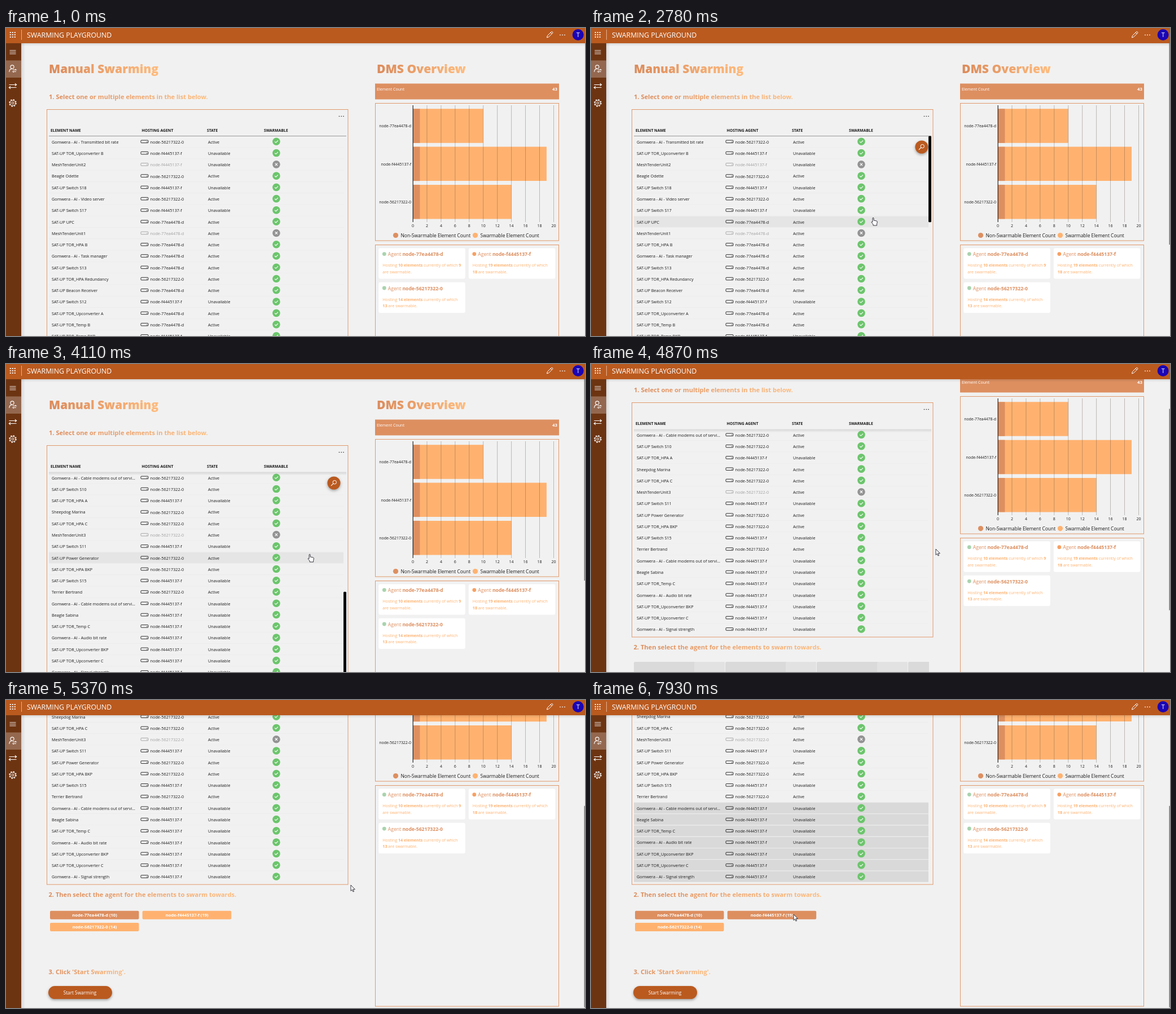
Animation, 1026 px wide and 546 px high, one loop 8000 ms. Source, as an HTML page with a canvas:

```html
<!DOCTYPE html>
<html lang="en">
<head>
<meta charset="utf-8">
<title>Swarming Playground</title>
<style>
html, body { margin: 0; width: 100%; height: 100%; overflow: hidden; background: #f1f1f1; }
canvas { display: block; }
</style>
</head>
<body>
<canvas id="stage" width="1026" height="546"></canvas>
<script>
const g = document.getElementById('stage').getContext('2d');
const LOOP = 8000, ROW = 20.27, TOP = 191.6, VIEW = 18 * ROW;
const BG = '#f1f1f1', BRAND = '#ba5a1f', DARK = '#dd8f60', LIGHT = '#ffb270', EDGE = '#e0986b';
const FONT = '"Open Sans", "Noto Sans", sans-serif';

const hosts = { 7: 'node-77ea4478-d', f: 'node-f4445137-f', 5: 'node-56217322-0' };
// Host key, then name: * is an AI probe, + is an uplink part
const rows = `5*Transmitted bit rate|f+TOR_Upconverter B|fMeshTenderUnit2|5Beagle Odette|f+Switch S18
5*Video server|f+Switch S17|7+UPC|7MeshTenderUnit1|7+TOR_HPA B|7*Task manager|7+Switch S13
5+TOR_HPA Redundancy|7+Beacon Receiver|f+Switch S12|7+TOR_Upconverter A|7+TOR_Temp B
f+TOR_Temp BKP|7+Switch S14|7Antelope Finn|f+Combiner|f+Switch S19|5Sheepdog Milo|5+TOR_Temp A
f*Cable modems out of servi...|5*Cable modems out of servi...|5+Switch S10|f+TOR_HPA A
5Sheepdog Marina|5+TOR_HPA C|5MeshTenderUnit3|f+Switch S11|5+Power Generator|5+TOR_HPA BKP
f+Switch S15|5Terrier Bertrand|f*Cable modems out of servi...|fBeagle Sabina|f+TOR_Temp C
f*Audio bit rate|f+TOR_Upconverter BKP|f+TOR_Upconverter C|f*Signal strength`
  .split(/[|\n]/).map(s => ({
    host: s[0],
    name: s.slice(1).replace('*', 'Gomwera - AI - ').replace('+', 'SAT-UP '),
    fixed: s.includes('Tender')
  }));
const MAX_LIST = rows.length * ROW - VIEW;

// Key times: [ms, x, y, linear?]
const pointerKeys = [
  [330, 1030, 470], [1080, 837, 404], [1280, 837, 404], [1420, 832, 401], [2200, 832, 401],
  [2760, 500, 336], [3900, 500, 336, 1], [4110, 538, 337, 1], [4520, 611, 328], [5400, 611, 328],
  [5600, 590, 319], [6420, 408.5, 196], [6600, 408.5, 196], [6900, 395, 308], [7000, 395, 308],
  [7240, 375, 394], [7310, 375, 394], [7520, 359, 380]
];
const listKeys = [[2860, 0, 0, 1], [3410, 395, 0, 1], [3600, 475, 0, 1], [3820, MAX_LIST, 0]];

function track(keys, t) {
  const i = keys.findIndex(k => k[0] > t);
  if (i === 0) return keys[0].slice(1, 3);
  if (i < 0) return keys[keys.length - 1].slice(1, 3);
  const a = keys[i - 1], b = keys[i];
  let u = (t - a[0]) / (b[0] - a[0]);
  if (!a[3]) u = u * u * (3 - 2 * u);
  return [a[1] + (b[1] - a[1]) * u, a[2] + (b[2] - a[2]) * u];
}
const clamp = v => Math.max(0, Math.min(1, v));
const pageScroll = t => 233 * (1 - (1 - clamp((t - 4760) / 620)) ** 2);

// Drawing helpers
function rect(x, y, w, h, color, r = 0) {
  g.fillStyle = color;
  g.beginPath();
  g.roundRect(x, y, w, h, r);
  g.fill();
}
function frame(x, y, w, h, color) {
  g.strokeStyle = color;
  g.lineWidth = 1;
  g.strokeRect(x, y, w, h);
}
function dot(x, y, r, color) {
  g.fillStyle = color;
  g.beginPath();
  g.arc(x, y, r, 0, 7);
  g.fill();
}
function ring(x, y, r, color, w) {
  g.strokeStyle = color;
  g.lineWidth = w;
  g.beginPath();
  g.arc(x, y, r, 0, 7);
  g.stroke();
}
function path(d, stroke, w = 1, fill) {
  const p = new Path2D(d);
  if (fill) { g.fillStyle = fill; g.fill(p); }
  g.strokeStyle = stroke;
  g.lineWidth = w;
  g.stroke(p);
}
function clip(x, y, w, h) {
  g.save();
  g.beginPath();
  g.rect(x, y, w, h);
  g.clip();
}
function shadow(blur, y) {
  g.shadowColor = 'rgba(0,0,0,.35)';
  g.shadowBlur = blur;
  g.shadowOffsetY = y;
}
// Text centred on its capitals at y; returns its width
function text(s, x, y, size, color = '#1b1b1b', weight = 400, align = 'left') {
  g.font = `${weight} ${size}px ${FONT}`;
  g.textAlign = align;
  g.fillStyle = color;
  g.fillText(s, x, y + size * 0.357);
  return g.measureText(s).width;
}
// Runs alternate regular and bold
function runs(s, x, y, size, color) {
  s.split('*').forEach((part, i) => { x += text(part, x, y, size, color, i % 2 ? 700 : 400); });
}
function heading(s, x, y, size, weight) {
  g.font = `${weight} ${size}px ${FONT}`;
  const fade = g.createLinearGradient(x, 0, x + g.measureText(s).width, 0);
  fade.addColorStop(0, '#dc8a5a');
  fade.addColorStop(1, '#ffbb7c');
  text(s, x, y, size, fade, weight);
}
function fadeBox(x, y, w, h, dx, dy) {
  const f = g.createLinearGradient(x, y, x + dx, y + dy);
  f.addColorStop(0, 'rgba(0,0,0,.11)');
  f.addColorStop(1, 'rgba(0,0,0,0)');
  rect(x, y, w, h, f);
}

function tableRow(row, y, fill) {
  if (fill) rect(76, y + 0.3, 522, ROW - 1, fill);
  rect(76, y + ROW - 0.7, 522, 0.7, '#ebebeb');
  const c = y + 10.5, mark = y + 9.7, ink = row.fixed ? '#a0a0a0' : '#1b1b1b';
  path(`M240 ${mark - 2.3}h11q1 0 1 1v2.6q0 1-1 1h-11q-1 0-1-1v-2.6q0-1 1-1zM249 ${mark + 0.6}h1.5`, ink, 0.9);
  text(row.name, 81, c, 7.25);
  text(hosts[row.host], 255.5, c, 7.3, ink);
  text(row.host === 'f' ? 'Unavailable' : 'Active', 358, c, 7.25);
  dot(479, mark, 6.8, row.fixed ? '#939393' : '#6cc56c');
  path(row.fixed ? `M476.8 ${mark - 2.2}l4.4 4.4m0-4.4l-4.4 4.4` : `M476.2 ${mark}l2 2 3.8-3.8`, '#fff', 1.1);
}

function table(t, list, hover) {
  frame(72.5, 144.5, 533.5, 415.5, EDGE);
  for (const x of [590.5, 594.3, 598]) dot(x, 156.5, 0.8, '#222');
  [['ELEMENT NAME', 79], ['HOSTING AGENT', 240.5], ['STATE', 356], ['SWARMABLE', 457]]
    .forEach(([s, x]) => text(s, x, 181.3, 6.85, '#1b1b1b', 700));

  clip(73, TOP, 532, VIEW);
  rows.forEach((row, i) => {
    const y = TOP + i * ROW - list;
    if (y < TOP - ROW || y > TOP + VIEW) return;
    const picked = i === 36 ? t > 6560 : i > 36 && t > 6950;
    tableRow(row, y, picked ? '#d9d9d9' : i === hover ? '#e5e5e5' : null);
  });
  g.restore();
  if (list > 0) fadeBox(76, TOP, 527, 6, 0, 6);
  else rect(76, TOP - 0.6, 527, 1, '#999');

  // Thumb and search button while the pointer is over the table
  const active = (t > 2540 && t < 4480) || (t > 5460 && t < 7330);
  if (!active) return;
  rect(598, TOP + list / (rows.length * ROW) * VIEW, 5, VIEW * VIEW / (rows.length * ROW), '#0a0a0a', 1.5);
  const x = 581 + 25 * (1 - clamp((t - (t < 5000 ? 2540 : 5460)) / 300));
  clip(73, 145, 532.5, 415);
  g.save();
  shadow(5, 2);
  dot(x, 211, 11.5, BRAND);
  g.restore();
  ring(x + 1.3, 209.6, 3.2, '#fff', 1);
  path(`M${x - 1} ${211.9}l-4 4`, '#fff', 1.1);
  g.restore();
}

function agentButton(key, count, x, y, dark) {
  rect(x, y, 157.5, 15, dark ? DARK : LIGHT, 2);
  text(`${hosts[key]} (${count})`, x + 79, y + 7.6, 7.6, '#fff', 700, 'center');
}

function skeleton() {
  clip(76, 604, 523, 85);
  for (let y = 604; y < 689; y += 20.4)
    for (let x = 76; x < 599; x += 162) {
      rect(x, y, 161, 19, '#dadada', 2);
      rect(x + 107, y, 54, 19, '#e2e2e2', 2);
    }
  g.restore();
}

function steps(t) {
  heading('2. Then select the agent for the elements to swarm towards.', 75.5, 578, 11.1, 700);
  if (t < 5300) skeleton();
  else {
    agentButton('7', 10, 78, 606.7, true);
    agentButton('f', 19, 241.7, 606.7, t > 7400);
    agentButton('5', 14, 78, 628, false);
  }
  heading("3. Click 'Start Swarming'.", 75.5, 715, 11.1, 700);
  g.save();
  shadow(4, 2);
  rect(75, 740, 113, 23, BRAND, 11.5);
  g.restore();
  text('Start Swarming', 131, 751.8, 8.25, '#fff', 400, 'center');
}

function chart() {
  const X0 = 721, UNIT = 12.47;
  rect(654, 98.5, 326, 28, DARK);
  text('Element Count', 657, 108.3, 7.1, '#fff');
  text('43', 977, 108.3, 7.8, '#fff', 700, 'right');
  frame(654.5, 133.5, 325, 243.5, EDGE);
  [['7', 10], ['f', 19], ['5', 14]].forEach(([key, n], i) => {
    const y = 143.3 + i * 67.3;
    rect(X0, y, n * UNIT, 60.5, LIGHT);
    rect(X0, y, UNIT, 60.5, DARK);
    text(hosts[key], 718, y + 30.5, 6.95, '#1b1b1b', 400, 'right');
  });
  for (let v = 0; v <= 20; v += 2) {
    const x = X0 + v * UNIT;
    rect(x - 0.4, 137, v ? 0.9 : 1.1, 207, v ? 'rgba(60,50,40,.33)' : '#111');
    text(v, x, 350.5, 7, '#1b1b1b', 400, 'center');
  }
  dot(690.5, 367.5, 4.6, DARK);
  text('Non-Swarmable Element Count', 699.5, 367.7, 8.45);
  dot(831.5, 367.5, 4.6, LIGHT);
  text('Swarmable Element Count', 840.5, 367.7, 8.45);
}

function agentCard(x, y, key, color, line1, line2) {
  rect(x, y, 153.5, 54.3, '#fff', 3);
  dot(x + 10, y + 10.3, 3.4, color);
  runs(`Agent *${hosts[key]}`, x + 16.5, y + 10.9, 8.65, DARK);
  runs(line1, x + 7, y + 30.3, 7.2, LIGHT);
  runs(line2, x + 7, y + 41.8, 7.2, LIGHT);
}

function overview() {
  heading('DMS Overview', 657, 72.6, 21.1, 800);
  chart();
  frame(654.5, 384.5, 325, 391.5, EDGE);
  agentCard(660.3, 390.3, '7', '#a9d3ae', 'Hosting *10 elements* currently of which *9', 'are swarmable.');
  agentCard(819.8, 390.3, 'f', '#f7a063', 'Hosting *19 elements* currently of which', '*18* are swarmable.');
  agentCard(660.3, 450.7, '5', '#a9d3ae', 'Hosting *14 elements* currently of which', '*13* are swarmable.');
}

function chrome(t, scroll) {
  fadeBox(27, 27, 7, 519, 7, 0);
  fadeBox(27, 27, 999, 5, 0, 5);
  if (t > 400) rect(1024.5, 27 + scroll * 0.69, 1.5, 357, '#7a7a7a');
  rect(0, 27, 27, 519, '#6d3412');
  rect(0, 57.5, 27, 30.5, '#94684f');
  path('M6.5 39.8h11M6.5 42.8h11M6.5 45.8h11', '#fff', 0.9);
  ring(11, 69, 3.1, '#fff', 1.1);
  path('M5.8 78q0-5.6 5.2-5.6M12 74.3h6l-1.7-1.5M18 77.2h-6l1.7 1.5', '#fff', 1.1);
  path('M5.5 100.5h13l-2.6-2.4m2.6 2.4l-2.6 2.4M18.5 105.5h-13l2.6-2.4m-2.6 2.4l2.6 2.4', '#fff', 1.1);
  ring(12, 133, 2, '#fff', 1);
  ring(12, 133, 4.8, '#fff', 1);
  g.setLineDash([2.35, 2.36]);
  ring(12, 133, 6, '#fff', 1.5);
  g.setLineDash([]);

  rect(0, 0, 1026, 27, BRAND);
  for (let i = 0; i < 9; i++) rect(6.8 + i % 3 * 4, 7 + (i / 3 | 0) * 4, 2, 2, '#fff', 0.6);
  rect(27, 3, 1, 18, '#e3b394');
  text('SWARMING PLAYGROUND', 37, 12.7, 12.35, '#fff');
  path('M958.5 17l.9-3.4 7-7q1.2-.6 2 .3t.3 2l-7 7zM965 8l2.4 2.4', '#fff', 1);
  for (const x of [982, 986, 990]) dot(x, 12.3, 0.9, '#fff');
  dot(1013.7, 12, 10, '#1b04b4');
  text('T', 1013.7, 12.3, 11, '#fff', 400, 'center');
}

function pointer(x, y, hand) {
  g.save();
  g.translate(x, y);
  g.lineJoin = 'round';
  path(hand
    ? 'M-1 1Q0-.8 1 1V5L6 6Q7.5 6.5 7.3 8L6.5 11.5V14H0V12L-3 8.5Q-3.4 7-1 8Z'
    : 'M0 0V10.5L2.4 8.3 4 12 5.6 11.3 4 7.7H7.4Z', '#22222e', 0.9, '#fff');
  g.restore();
}

function draw(t) {
  const scroll = pageScroll(t), list = track(listKeys, t)[0], [px, py] = track(pointerKeys, t);
  const pageY = py + scroll;
  const over = px > 76 && px < 605 && pageY > TOP && pageY < TOP + VIEW;
  // Row highlight trails the scrolling slightly
  const hover = over ? Math.floor((pageY - TOP + track(listKeys, t - 30)[0]) / ROW) : -1;

  rect(0, 0, 1026, 546, BG);
  g.save();
  g.translate(0, -scroll);
  heading('Manual Swarming', 76, 72.6, 20.85, 800);
  heading('1. Select one or multiple elements in the list below.', 76, 122, 11.1, 700);
  table(t, list, hover);
  steps(t);
  overview();
  g.restore();
  chrome(t, scroll);
  if (t > 330) pointer(px, py, over);
}

function tick() {
  draw(performance.now() % LOOP);
  requestAnimationFrame(tick);
}
tick();
</script>
</body>
</html>
```
